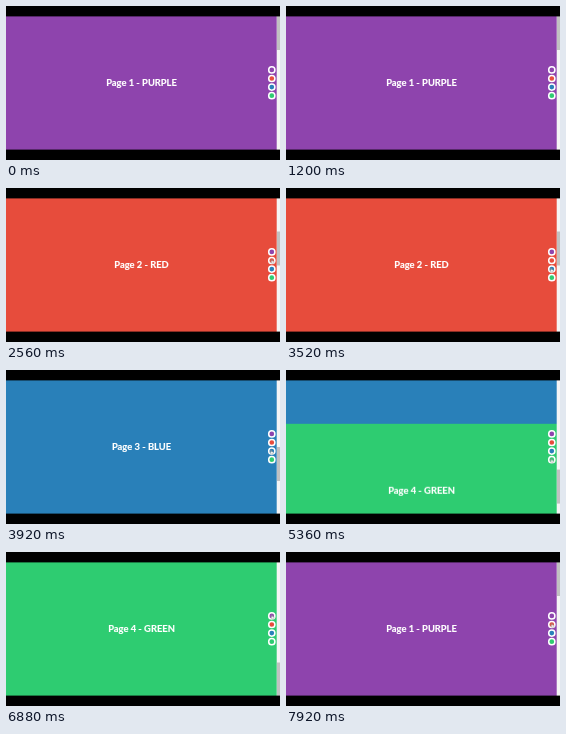
An HTML page that plays this animation: 274 px wide and 154 px high, repeating every 8 s.

```html
<!DOCTYPE html>
<html lang="en">
<head>
<meta charset="utf-8">
<title>Page navigation</title>
<style>
  :root {
    --purple: #8e44ad;
    --red: #e74c3c;
    --blue: #2980b9;
    --green: #2ecc71;
    --loop: 8s;
    --page: 134px;
  }
  html, body { margin: 0; width: 100%; height: 100%; overflow: hidden; background: #000; }
  .view { position: absolute; left: 0; top: 10px; width: 274px; height: var(--page); overflow: hidden; }
  /* Soft edge against the letterbox */
  .view::after {
    content: ""; position: absolute; inset: 0;
    border: solid rgba(0, 0, 0, .4); border-width: 1px 0;
  }
  .pages, .thumb { animation: scroll var(--loop) ease-in-out infinite; }
  .pages { --step: -25%; width: 271px; }
  .pages section {
    height: var(--page);
    display: flex; align-items: center; justify-content: center;
    color: #fff; font: 700 9.35px/1 Lato, sans-serif; white-space: pre;
    -webkit-text-stroke: .2px #fff;
  }
  .purple { background: var(--purple); fill: var(--purple); }
  .red { background: var(--red); fill: var(--red); }
  .blue { background: var(--blue); fill: var(--blue); }
  .green { background: var(--green); fill: var(--green); }

  .bar {
    position: absolute; right: 0; top: 0; width: 3px; height: 100%;
    background: #f5f5f5; border-left: 1px solid rgba(245, 245, 245, .3);
    background-clip: padding-box;
  }
  .thumb { --step: 100%; height: 25%; background: #c1c1c1; }

  .dots { position: absolute; left: 0; top: 0; }
  .dots circle { stroke: #fff; stroke-width: 1.5; }
  .hand { animation: move var(--loop) ease-in-out infinite; }

  /* Each click glides quickly to its page */
  @keyframes scroll {
    0%, 27.75% { transform: none; }
    31.5%, 45.25% { transform: translateY(var(--step)); }
    48.9%, 64.75% { transform: translateY(calc(2 * var(--step))); }
    68.5%, 91.25% { transform: translateY(calc(3 * var(--step))); }
    95%, 100% { transform: none; }
  }
  @keyframes move {
    0%, 20% { transform: translate(10px, 12px); }
    26%, 38% { transform: translate(0, 8.6px); }
    43%, 59% { transform: translate(-.6px, 17.2px); }
    62.5%, 75% { transform: translate(-.4px, 25.8px); }
    82.5%, 95% { transform: none; }
    98.5%, 100% { transform: translate(0, 8.6px); }
  }
</style>
</head>
<body>
<div class="view">
  <div class="pages">
    <section class="purple">Page 1 - PURPLE</section>
    <section class="red">Page 2 - RED</section>
    <section class="blue">Page 3 - BLUE</section>
    <section class="green">Page 4 - GREEN</section>
  </div>
  <div class="bar"><div class="thumb"></div></div>
  <svg class="dots" width="274" height="134">
    <circle class="purple" cx="265.8" cy="53.9" r="3.1"/>
    <circle class="red" cx="265.8" cy="62.5" r="3.1"/>
    <circle class="blue" cx="265.8" cy="71.1" r="3.1"/>
    <circle class="green" cx="265.8" cy="79.7" r="3.1"/>
    <g class="hand">
      <path transform="translate(264.2 52.2) scale(.5)"
        d="M2.2 1Q3 .2 3.8 1V3.8L6.6 4.4Q7.5 4.8 7.3 6L6.6 9.3H3L.7 6.2Q1 5 2.2 5.8Z"
        fill="#fff" stroke="#333" stroke-width=".6"/>
    </g>
  </svg>
</div>
</body>
</html>
```
